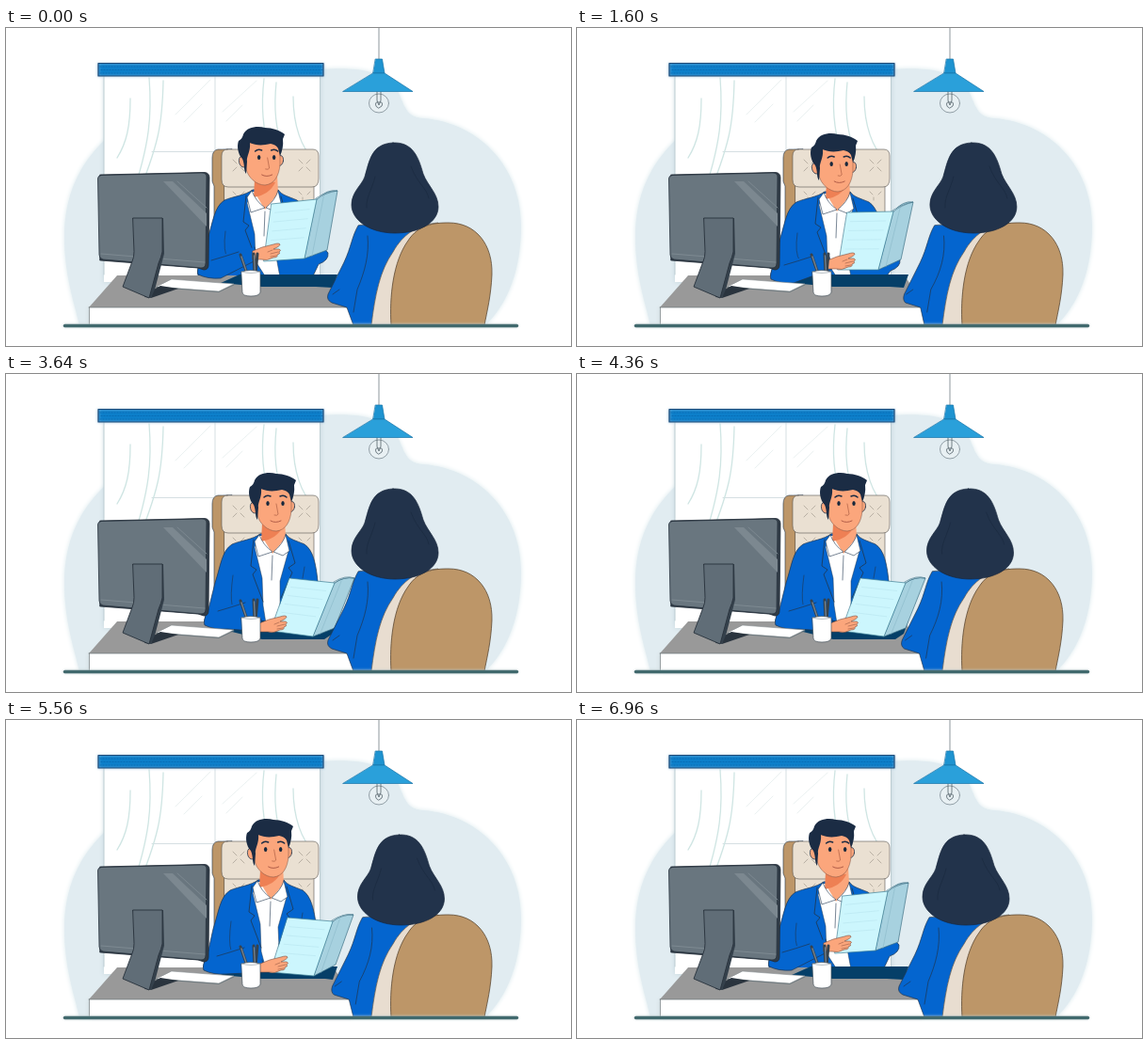
Recreate the animation shown at these times as an HTML page with a canvas. Size 600 by 338 pixels, loop 7 s.

```html
<!DOCTYPE html>
<html lang="en">
<head>
<meta charset="utf-8">
<title>Office interview</title>
<style>
html, body { margin: 0; width: 100%; height: 100%; overflow: hidden; background: #fff; }
canvas { display: block; width: 100vw; height: 100vh; }
</style>
</head>
<body>
<canvas id="stage"></canvas>
<script>
const W = 600, H = 338, LOOP = 7000, STEP = 40;
const INK = '#20364f', BLUE = '#0465cf', SKIN = '#fba67c', CREAM = '#eae0d2', TAN = '#bd9668', HAIR = '#22334b';
const canvas = document.getElementById('stage');
const ctx = canvas.getContext('2d');

function shape(d, fill, line, width = 0.8) {
  const path = new Path2D(d);
  if (fill) { ctx.fillStyle = fill; ctx.fill(path); }
  if (line) { ctx.strokeStyle = line; ctx.lineWidth = width; ctx.stroke(path); }
}
const stroke = (d, color = INK, width = 0.8) => shape(d, null, color, width);

function oval(x, y, rx, ry, fill, line, turn = 0) {
  ctx.beginPath();
  ctx.ellipse(x, y, rx, ry, turn, 0, 7);
  if (fill) { ctx.fillStyle = fill; ctx.fill(); }
  if (line) { ctx.strokeStyle = line; ctx.lineWidth = 0.8; ctx.stroke(); }
}

function glow(color, blur, draw) {
  ctx.save();
  ctx.shadowColor = color;
  ctx.shadowBlur = blur;
  draw();
  ctx.restore();
}

// Poses of the man: head, body, left elbow, right elbow, hand,
// book: left top, spine top, spine bottom, left bottom, right top, right bottom.
const reading = [-12, 0, -8, 2, 204, 263, 342, 247, 279, 238, 282, 187, 330, 182, 317, 245, 274, 248, 352, 173, 341, 236];
const lowering = [-10, 7, -7, 4, 206, 268, 343, 254, 283, 248, 287, 196, 336, 195, 320, 257, 277, 257, 357, 185, 344, 246];
const almost = [-7, 2, -4, 1, 208, 267, 340, 258, 284, 264, 297, 214, 347, 217, 325, 276, 280, 271, 366, 210, 346, 263];
const resting = [0, 0, 0, 0, 211, 268, 340, 258, 286, 266, 301, 217, 349, 222, 326, 279, 281, 273, 370, 217, 349, 270];
const lifting = [-3, 0, -2, 0, 210, 267, 339, 258, 287, 260, 299, 210, 347, 214, 327, 272, 281, 268, 369, 207, 350, 260];
const manTimes = [0, 1600, 2480, 3640, 4360, 5560, 7000];
const manPoses = [reading, lowering, almost, resting, resting, lifting, reading];
const womanTimes = [0, 1500, 3000, 3600, 5000, 7000];
const womanSway = [0, 8, 0, 0, 8, 0];

// Smooth curve through the keys that never overshoots.
function along(times, values, t) {
  let i = 0;
  while (i < times.length - 2 && t >= times[i + 1]) i++;
  const slope = k => {
    if (k < 1 || k > times.length - 2) return 0;
    const a = (values[k] - values[k - 1]) / (times[k] - times[k - 1]);
    const b = (values[k + 1] - values[k]) / (times[k + 1] - times[k]);
    return a * b <= 0 ? 0 : 2 * a * b / (a + b);
  };
  const d = times[i + 1] - times[i], u = (t - times[i]) / d, v = 1 - u;
  return values[i] * (1 + 2 * u) * v * v + slope(i) * d * u * v * v
    + values[i + 1] * u * u * (3 - 2 * u) - slope(i + 1) * d * u * u * v;
}

function room() {
  glow('#d9e8ec', 5, () => shape('M104 120C78 145 62 178 62 222C62 262 72 290 78 316H509C533 293 547 257 547 210C547 150 505 101 443 96C428 95 425 88 419 74C410 47 379 41 334 44V120Z', '#e1ecf1'));
  glow('#c4d4da', 5, () => shape('M104 51H334V270H104Z', '#fff'));
  stroke('M104 51V262M333.500 51V262', '#bccdd2', 1);
  stroke('M222 52V130M155 131.500H222', '#d5dfe2', 1);
  stroke('M180 92L217 55M189 100L208 81M230 89L266 56M234 99L251 82', '#e6eeee', 0.8);
  const fold = '#cfe5e3';
  stroke('M152 53C155 92 153 123 133 181M167 56C166 102 163 122 136 188M132 75C132 105 128 122 118 138', fold, 1.3);
  stroke('M274 54C270 88 274 112 280 131M287 58C284 88 287 106 293 128M305 73C305 104 314 128 327 140', fold, 1.3);
  glow('#9fc3dd', 3, () => shape('M98 37.500H337V51H98Z', '#0d7fca', '#1c4a78', 1.2));
  ctx.save();
  ctx.setLineDash([1, 2]);
  stroke('M100 41H336M101 44.500H336M100 48H336', '#0768b0', 0.8);
  ctx.restore();
}

function lamp() {
  stroke('M396 0V33', '#8d979c', 1);
  oval(396, 80, 10.5, 10, '#e8f0f3', '#7d8b93');
  stroke('M394 68V77L396 82L398 77V68M393 83Q391 78 396 79Q401 78 399 83L396 85Z', '#637078', 0.9);
  shape('M392.500 33H399.500L402 48H390Z', '#1e93d0', '#1673a8', 0.7);
  shape('M390 48H402L432 67.500H358Z', '#2aa0da', '#1673a8', 0.7);
}

function bossChair() {
  shape('M229 129H225Q219 130 219 138V163L221 168V230H240V129Z', TAN, INK, 0.6);
  shape('M232 166H327V240H232Z', CREAM, '#55514d', 0.6);
  shape('M235 129H326Q332 129 332 136V160Q332 169 325 169H236Q229 169 229 161V136Q229 129 235 129Z', CREAM, '#55514d', 0.6);
  for (const x of [247, 317]) {
    stroke(`M${x - 6} 140l4 4m4 4l4 4m0-12l-4 4m-4 4l-4 4`, '#a49b90', 0.7);
    stroke(`M${x - 6} 174l3 3m6 0l3-3m-8 6v3`, '#a49b90', 0.7);
  }
}

function torso(p) {
  const [, , bx, by, ex, ey, rx, ry] = p;
  const q = (x, y, k = 1) => `${x + bx * k} ${y + by * k} `;
  shape(`M${q(270, 170)}C${q(262, 176)}${q(249, 177)}${q(240, 181)}C${q(229, 188)}${q(228, 204)}${q(222, 222)}
    L${ex + 4} ${ey - 18}Q${ex - 2} ${ey - 5} ${ex} ${ey}L240 272H322L${rx - 10} ${ry + 4}Q${rx + 1} ${ry} ${rx} ${ry - 8}
    L${q(331, 220, 0.6)}C${q(329, 201)}${q(326, 187)}${q(317, 181)}C${q(308, 177)}${q(301, 176)}${q(297, 170)}Z`, BLUE, INK, 0.7);
  shape(`M${q(269, 172)}L${q(264, 184)}L${q(272, 217)}L${q(273, 246)}L276 265H291L${q(291, 220)}L${q(300, 188)}L${q(296, 172)}Z`, '#fff', INK, 0.5);
  stroke(`M${q(263, 176)}L${q(260, 204)}L${q(266, 208)}L${q(262, 213)}L${q(273, 242)}M${q(300, 177)}L${q(307, 201)}L${q(300, 206)}L${q(304, 211)}L${q(292, 238)}`);
  stroke(`M${q(241, 214)}Q${q(238, 236)}${q(240, 245, 0.5)}M${q(317, 205)}L${q(315, 217)}M${q(283, 193)}L${q(282, 219)}`, INK, 0.6);
  // neck and collar
  shape(`M${q(272, 154)}V${173 + by}L${q(283, 191)}L${q(297, 174)}L${q(296, 154)}Z`, SKIN);
  shape(`M${q(272, 159)}L${q(271, 178)}Q${q(288, 175)}${q(294, 162)}Z`, '#ee8054');
  shape(`M${q(269, 171)}L${q(264, 178)}L${q(268, 194)}L${q(283, 189)}Q${q(273, 182)}${q(269, 171)}Z`, '#fff', INK, 0.6);
  shape(`M${q(297, 171)}L${q(301, 188)}L${q(294, 193)}L${q(284, 189)}Q${q(294, 181)}${q(297, 171)}Z`, '#fff', INK, 0.6);
}

function head(p) {
  ctx.save();
  ctx.translate(p[0], p[1]);
  oval(263.5, 142, 4, 6, SKIN, INK, -0.2);
  oval(303, 141, 3.5, 5.5, SKIN, INK, 0.2);
  shape('M265 122H303V145C302 157 297 166 287 167C278 167 269 159 267 150Z', SKIN, '#7a5042', 0.5);
  shape('M267 155C264 151 266 146 263 139C258 134 257 125 259 120Q263 118 264 113C268 105 279 104 287 106C295 106 303 109 308 113L306 118Q307 127 303 136L301 128Q299 124 293 123C285 125 277 125 271 122C272 131 267 137 268 142Z', '#1b2c44');
  ctx.translate(-p[0] * 0.22, 0);
  stroke('M274 131Q277 128 281 130M291 130Q295 128 298 131', '#1b2c44', 1.5);
  oval(278, 137.5, 1.7, 2.5, '#18283c');
  oval(294, 137.5, 1.7, 2.5, '#18283c');
  stroke('M287 138L289 149Q288 151 285 150', '#b7684b', 0.8);
  stroke('M281 156Q286 159 292 156', '#a95542', 0.9);
  ctx.restore();
}

function desk() {
  glow('#c8d2d5', 4, () => shape('M88 297H369V316H88Z', '#fff'));
  shape('M118 263H348L369 297H88Z', '#999');
  stroke('M88 297H369M88.500 297V316', '#6c777a', 0.7);
}

function arm(p) {
  const [, , , , ex, ey, , , hx, hy, , , , , sx, sy] = p;
  const low = Math.max(275, sy + 3);
  shape(`M228 271L248 262H352L347 276L${sx + 12} ${low}H272Z`, '#053f68');
  shape(`M${ex + 3} ${ey - 17}Q${ex - 2} ${ey - 5} ${ex} ${ey - 1}Q${ex + 10} ${ey + 4} ${ex + 24} ${ey + 3}
    L${hx - 12} ${hy + 8}L${hx - 15} ${hy - 5}L${ex + 38} ${ey - 25}Z`, BLUE);
  stroke(`M${ex + 3} ${ey - 17}Q${ex - 2} ${ey - 5} ${ex} ${ey - 1}Q${ex + 10} ${ey + 4} ${ex + 24} ${ey + 3}L${hx - 12} ${hy + 8}L${hx - 15} ${hy - 5}`, INK, 0.7);
  stroke(`M${ex + 14} ${ey - 16}Q${ex + 28} ${ey - 20} ${ex + 43} ${ey - 25}`, INK, 0.7);
}

function book(p) {
  const [hx, hy, ax, ay, bx, by, cx, cy, dx, dy, ox, oy, ux, uy] = p.slice(8);
  shape(`M${bx} ${by}Q${(bx + ox) / 2} ${Math.min(by, oy) - 2} ${ox} ${oy}L${ux} ${uy}Q${(cx + ux) / 2} ${(cy + uy) / 2} ${cx} ${cy}Z`, '#a7d1df', '#3f7186', 0.7);
  shape(`M${bx} ${by}Q${bx + 9} ${by - 7} ${ox} ${oy}Q${bx + 12} ${by - 9} ${bx - 1} ${by - 1}Z`, '#e1f2f5', '#3f7186', 0.6);
  shape(`M${ax} ${ay}L${bx} ${by}L${cx} ${cy}L${dx} ${dy}Z`, '#ccf6fd', '#3f8096', 0.7);
  const at = (u, v) => {
    const mix = (a, b, c, d) => (a * (1 - u) + b * u) * (1 - v) + (d * (1 - u) + c * u) * v;
    return `${mix(ax, bx, cx, dx)} ${mix(ay, by, cy, dy)}`;
  };
  for (const v of [0.16, 0.32, 0.48, 0.64]) stroke(`M${at(0.1, v)}L${at(0.88, v)}`, '#b8e5ef', 0.6);
  stroke(`M${(bx * 2 + ox) / 3} ${(by * 2 + oy) / 3}L${(cx * 2 + ux) / 3} ${(cy * 2 + uy) / 3}`, '#8fbccc', 0.7);

  ctx.save();
  ctx.translate(hx, hy);
  shape('M-17 -1L-7 -5L5 -8Q11 -10 12 -8Q12 -6 5 -3L11 -3Q14 -2 11 0Q13 2 9 3Q10 6 5 6Q-2 10 -8 8L-17 8Z', SKIN, '#7a5042', 0.6);
  stroke('M4 -2L-1 0M10 0L2 2M8 4L2 5', '#9b5b45', 0.6);
  ctx.restore();
}

function deskItems() {
  shape('M176 267L242 272L226 280L160 275Z', '#fff', '#8c9396', 0.6);
  stroke('M160 275.500L226 280.500L242 273', '#66747a', 0.8);
  stroke('M249 241L256 261M263 240L264 261M267 240L265 261', '#35424e', 3);
  stroke('M250 243L256 261M263.500 242L264.500 261', '#75818b', 1.4);
  shape('M250 259Q260 256 270 259V281Q269 285 260 285Q251 285 251 281Z', '#fff', '#4a555d', 0.7);
  stroke('M250 259Q260 262 270 259', '#86939a', 0.6);
}

function monitor() {
  shape('M100 156L211 153.500Q216 154 216 159L215 252Q215 257 210 257L204 255L100 247Z', '#303b46', '#222d38', 0.8);
  shape('M101 156.500L208 154Q213 154 213 158L212 250Q212 255 207 255L103 246Q99 245 99 241L97.500 160Q97.500 157 101 156.500Z', '#69767f', '#28333e', 0.8);
  stroke('M101 240L211 249', '#8b979e', 0.6);
  shape('M167 163H177L213 197V211Z', '#7c8890');
  stroke('M182 163L213 191', '#7c8890', 1);
  shape('M154 287L183 277L164 274L155 279Z', '#2a343e');
  shape('M134 202L167 202L168 240L158 278L154 287L147 286L164 240Z', '#35414c');
  shape('M135 202H166V238Q165 243 162 250L152 287L124 275L134 248Q136 244 136 238Z', '#606d77', '#27323c', 0.9);
}

function woman(dx) {
  const a = dx * 0.7, b = dx * 0.35;
  shape(`M${374 + a} 210C${367 + a} 222 ${367 + a} 232 ${359 + a} 249L${342 + a} 283Q${340 + a} 289 ${346 + b} 292
    L${362 + b} 297L369 316H420L455 220L${435 + a} 205Z`, BLUE, INK, 0.7);
  stroke(`M${384 + a} 221C${386 + a} 241 ${381 + a} 259 ${373 + b} 278L${369 + b} 302M${347 + b} 283L${354 + b} 278`, INK, 0.7);
  shape('M388 316C392 283 397 258 411 238C421 220 436 209 459 207L440 316Z', '#e8ddd0', '#5c554d', 0.7);
  shape('M409 316C407 286 411 248 427 226C438 209 454 207 470 207C499 207 517 230 516 262C515 285 511 300 508 316Z', TAN, '#5c4934', 0.8);
  ctx.save();
  ctx.translate(dx, 0);
  shape('M411 122C432 121 438 137 443 155C448 168 459 176 459 190C459 207 439 218 413 218C386 218 367 204 367 188C367 174 378 167 381 158C386 141 388 123 411 122Z', HAIR, '#17263b', 0.7);
  stroke('M430 147C437 166 447 170 449 181M392 158C389 171 382 180 383 191', '#1a2a40', 0.7);
  ctx.restore();
}

function frame(now) {
  const t = Math.floor((now % LOOP) / STEP) * STEP;
  const ratio = window.devicePixelRatio || 1;
  const w = Math.round(innerWidth * ratio), h = Math.round(innerHeight * ratio);
  if (canvas.width !== w || canvas.height !== h) { canvas.width = w; canvas.height = h; }
  ctx.setTransform(w / W, 0, 0, h / H, 0, 0);
  ctx.lineJoin = ctx.lineCap = 'round';
  ctx.fillStyle = '#fff';
  ctx.fillRect(0, 0, W, H);

  const pose = reading.map((_, i) => along(manTimes, manPoses.map(p => p[i]), t));
  room();
  lamp();
  bossChair();
  torso(pose);
  head(pose);
  desk();
  arm(pose);
  book(pose);
  deskItems();
  monitor();
  woman(along(womanTimes, womanSway, t));
  glow('#c8d2d5', 3, () => stroke('M62.500 316.500H542.500', '#41696d', 3.4));
  requestAnimationFrame(frame);
}
frame(0);
</script>
</body>
</html>
```
